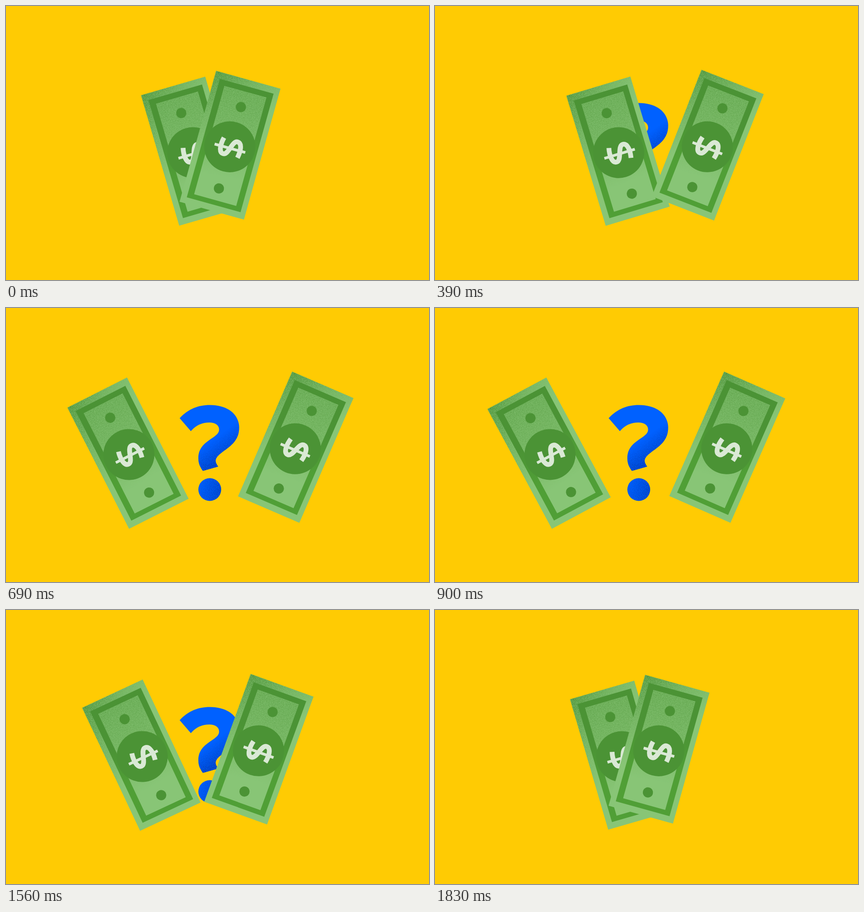
Write an HTML page that moves like this. It is 928 px wide and 603 px high and loops after 4.17 s.

```html
<!DOCTYPE html>
<html lang="en">
<head>
<meta charset="utf-8">
<title>Two bills and a question</title>
<style>
  html, body { margin: 0; width: 100%; height: 100%; overflow: hidden; background: #ffcb03; }
  svg { display: block; width: 100%; height: 100%; }

  .bill { transform-origin: 0 0; animation: 4170ms linear infinite; }
  .left  { animation-name: left-slide, left-turn; }
  .right { animation-name: right-slide, right-turn; }

  /* left: opens 350-900 ms, closes 1410-1830 ms */
  @keyframes left-slide {
    0% { translate: 408.5px 319.5px; }
    8.393% { translate: 408.5px 319.5px; animation-timing-function: cubic-bezier(.214, 0, .252, 1); }
    21.583% { translate: 250.3px 319.5px; }
    33.813% { translate: 250.3px 319.5px; animation-timing-function: cubic-bezier(.333, 0, .667, 1); }
    43.885%, 100% { translate: 408.5px 319.5px; }
  }
  @keyframes left-turn {
    0% { rotate: -16.25deg; }
    8.393% { rotate: -16.25deg; animation-timing-function: cubic-bezier(.214, 0, .252, 1); }
    21.583% { rotate: -28.2deg; }
    33.813% { rotate: -28.2deg; animation-timing-function: cubic-bezier(.25, 0, .97, 1); }
    43.885%, 100% { rotate: -16.25deg; }
  }

  /* right: opens 0-900 ms, closes 1230-1830 ms */
  @keyframes right-slide {
    0% { translate: 491.5px 306.4px; animation-timing-function: cubic-bezier(.214, 0, .252, 1); }
    21.583% { translate: 641.2px 306.4px; }
    29.496% { translate: 641.2px 306.4px; animation-timing-function: cubic-bezier(.333, 0, .667, 1); }
    43.885%, 100% { translate: 491.5px 306.4px; }
  }
  @keyframes right-turn {
    0% { rotate: 15.55deg; animation-timing-function: cubic-bezier(.214, 0, .252, 1); }
    21.583% { rotate: 23.7deg; }
    29.496% { rotate: 23.7deg; animation-timing-function: cubic-bezier(.25, 0, .97, 1); }
    43.885%, 100% { rotate: 15.55deg; }
  }
</style>
</head>
<body>
<svg viewBox="0 0 928 603" preserveAspectRatio="xMidYMid slice">
  <defs>
    <!-- breaks a soft shade into fine speckles -->
    <filter id="grain" color-interpolation-filters="sRGB">
      <feTurbulence type="fractalNoise" baseFrequency=".8" numOctaves="2" seed="4"/>
      <feColorMatrix values="0 0 0 0 1  0 0 0 0 1  0 0 0 0 1  2.6 0 0 0 -.8" result="noise"/>
      <feComposite in="SourceGraphic" in2="noise" operator="arithmetic" k1="1.4" k2=".3"/>
    </filter>

    <linearGradient id="cornerShade" gradientUnits="userSpaceOnUse" x1="-73" y1="-150" x2="30" y2="-55">
      <stop stop-color="#438a2e" stop-opacity=".62"/>
      <stop offset=".5" stop-color="#438a2e" stop-opacity=".25"/>
      <stop offset="1" stop-color="#438a2e" stop-opacity="0"/>
    </linearGradient>
    <linearGradient id="panelShade" gradientUnits="userSpaceOnUse" x1="-10" y1="-123" x2="10" y2="70">
      <stop stop-color="#4b9335" stop-opacity=".42"/>
      <stop offset=".5" stop-color="#4b9335" stop-opacity=".27"/>
      <stop offset="1" stop-color="#4b9335" stop-opacity="0"/>
    </linearGradient>
    <linearGradient id="frameFill" gradientUnits="userSpaceOnUse" x1="0" y1="-45" x2="12" y2="45">
      <stop stop-color="#4b9335"/>
      <stop offset="1" stop-color="#509f36"/>
    </linearGradient>
    <linearGradient id="hookShade" gradientUnits="userSpaceOnUse" x1="447" y1="296" x2="474" y2="332">
      <stop stop-color="#0038b0" stop-opacity="0"/>
      <stop offset="1" stop-color="#0038b0" stop-opacity=".6"/>
    </linearGradient>
    <linearGradient id="dotShade" gradientUnits="userSpaceOnUse" x1="424" y1="391" x2="472" y2="406">
      <stop stop-color="#0038b0" stop-opacity=".08"/>
      <stop offset="1" stop-color="#0038b0" stop-opacity=".58"/>
    </linearGradient>

    <path id="hook" d="M381 242.5C400 222 422 213.5 447 213.5C489 213.5 511.5 236 511.5 263
      C511.5 285 501 298 483 311C469 321 460 328 460 336C460 340 462 344 465.5 349L432 358.5
      C425 349 422 341 422 331C422 309 434 299 449 288.5C462 280 467.5 275 467.5 267.5
      C467.5 258 459 252 446 252C430 252 417 258 405.5 271Z"/>
    <circle id="dot" cx="447" cy="399.5" r="25"/>

    <g id="bill">
      <path fill="#88c576" d="M-73.3-149.5H73.3V149.5H-73.3Z"/>
      <path fill="url(#cornerShade)" filter="url(#grain)" d="M-73.3-149.5H73.3V149.5H-73.3Z M-47-122.6V125H48.8V-122.6Z" fill-rule="evenodd"/>
      <path fill="url(#panelShade)" filter="url(#grain)" d="M-47-122.6H48.8V125H-47Z"/>
      <path fill="url(#frameFill)" fill-rule="evenodd" d="M-60.7-134.8H61.7V135.8H-60.7Z M-47-122.6V125H48.8V-122.6Z"/>
      <g fill="#4b9335">
        <circle cx=".4" cy="3.5" r="56"/>
        <circle cx=".4" cy="-87.3" r="11.2"/>
        <circle cx="2" cy="98.2" r="11.2"/>
      </g>
      <g fill="none" stroke="#dae9d5">
        <path stroke-width="6" d="M-33.3 6.5H36.5"/>
        <path stroke-width="10.5" d="M-17.2-12.5C-20.5 1-21 22-9.5 22C2.5 22 2-11.5 14-11.5C25.5-11.5 26 8 23 22.3"/>
      </g>
    </g>
  </defs>

  <g fill="#0061ff"><use href="#hook"/><use href="#dot"/></g>
  <use href="#hook" fill="url(#hookShade)" filter="url(#grain)"/>
  <use href="#dot" fill="url(#dotShade)" filter="url(#grain)"/>

  <g class="bill left"><use href="#bill"/></g>
  <g class="bill right"><use href="#bill"/></g>
</svg>
</body>
</html>
```
